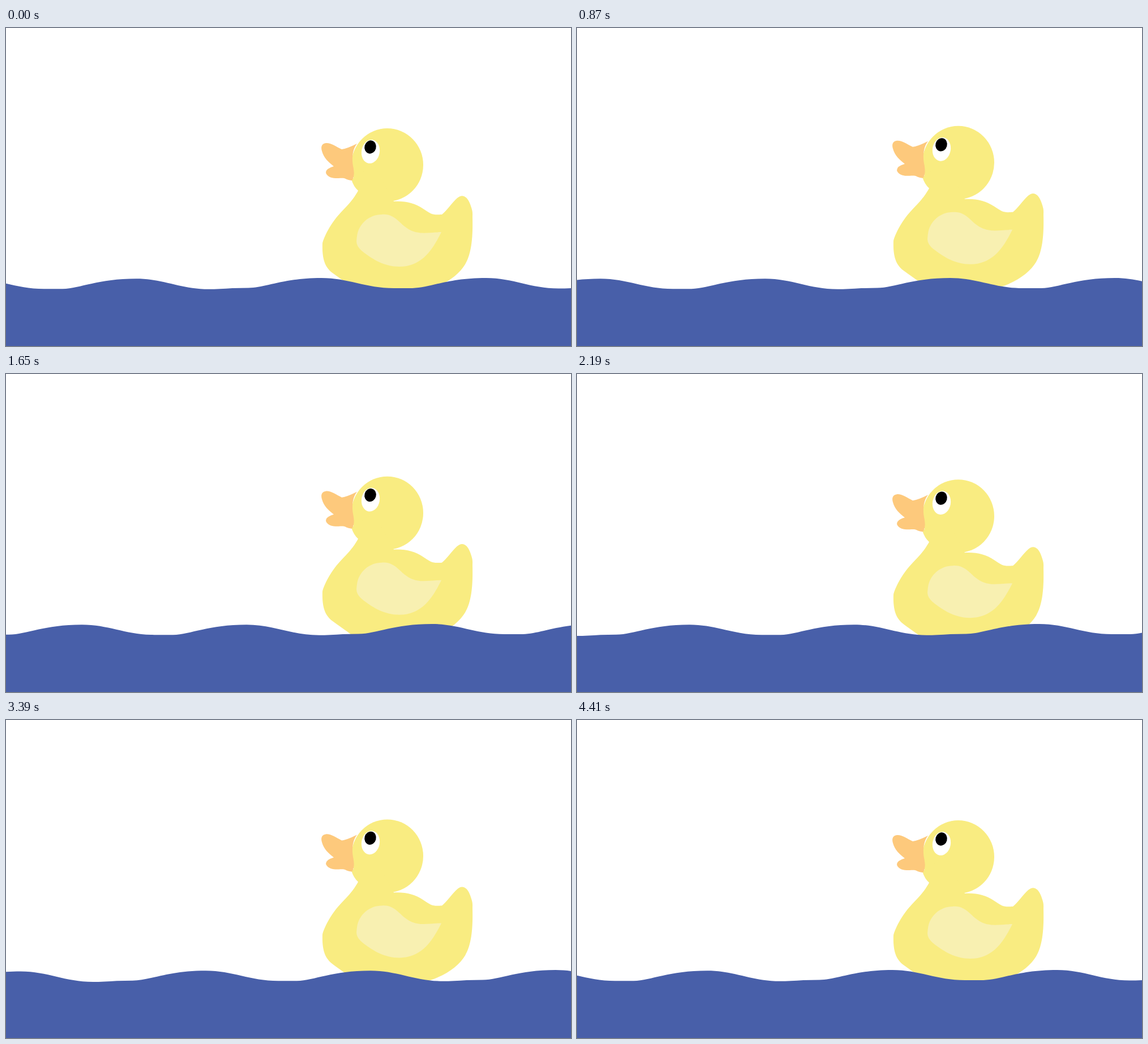
Write an HTML page that moves like this. It is 998 by 561 pixels and loops after 4440 ms.

```html
<!DOCTYPE html>
<html lang="en">
<head>
<meta charset="utf-8">
<title>Bobbing duck</title>
<style>
  html, body { margin: 0; height: 100%; overflow: hidden; background: #fff; }
  svg { display: block; width: 100vw; height: 100vh; }
</style>
</head>
<body>
<svg viewBox="0 0 998 561" preserveAspectRatio="none">
  <g id="duck">
    <g fill="#f9ec81">
      <ellipse cx="673.5" cy="241.5" rx="63.5" ry="64.5"/>
      <path d="M685 306C706 305 722 309 737 319S753 330 770 329C778 323 788 308 797 300S815 297 820 311
        S824 325 824 335C825 375 821 400 811 417S778 452 748 461S655 480 620 463C603 451 592 443 578 433
        S558 409 559 380C561 370 573 345 590 327S613 303 622 287Q614 280 610 267L650 241Z"/>
    </g>
    <path fill="#f8f0b1" d="M664 329C688 327 696 348 714 356.5S745 360.5 769 360C754 390 735 421 695 421
      C668 421 648 408 632 396S619 376 620 367C623 345 642 329 664 329Z"/>
    <path fill="#fdc97c" d="M620 204Q602 213 593 214C583 209 573 202 565 203S556 211 558 217
      C561 229 570 237 579 244Q565 248 565 255C566 261 574 265 582 265S597 264 600 266S609 269 611 269
      C616 262 615 253 613 243S611 215 620 204Z"/>
    <ellipse fill="#fff" rx="16" ry="21" transform="translate(644 218) rotate(10)"/>
    <ellipse rx="10.2" ry="11.7" transform="translate(643.5 210) rotate(15)"/>
  </g>
  <path id="water" fill="#485fa9"/>
</svg>
<script>
const LOOP = 4440, STEP = 30, SWELL = 618, RISE = 1.2;
const duck = document.getElementById('duck');
const water = document.getElementById('water');

// One swell holds two crests and ends RISE higher than it starts.
const crests = 'l28-.4c32-.6 62-17.6 129-17.6 48 0 78 18 128 18h33' +
               'c32-1 62-18 130-18 48 0 78 18.4 128 18.6';
const swell = `${crests}q19 0 42${-1.0 - RISE + .4}`;
water.setAttribute('d', `M${400 - 2 * SWELL} ${459 + 2 * RISE}${swell.repeat(3)}V600H${400 - 2 * SWELL}Z`);

// Key poses; the motion between them is linear.
const poses = [
  { t: 0, bob: 0, drift: 0 },
  { t: 600, bob: -6.9, drift: 70 },
  { t: 2363, bob: 10.9, drift: 280 },
  { t: 3190, bob: -6.3, drift: 377 },
  { t: 3685, bob: 5.3, drift: 468 },
  { t: 4410, bob: 0, drift: SWELL }
];

function draw() {
  const t = Math.floor(performance.now() % LOOP / STEP) * STEP;
  const i = Math.max(1, poses.findIndex(p => p.t >= t));
  const a = poses[i - 1], b = poses[i];
  const k = (t - a.t) / (b.t - a.t);
  const mix = key => a[key] + (b[key] - a[key]) * k;
  const lift = i === poses.length - 1 ? -RISE * k : 0;
  duck.setAttribute('transform', `translate(0 ${mix('bob')})`);
  water.setAttribute('transform', `translate(${mix('drift')} ${lift})`);
  requestAnimationFrame(draw);
}
draw();
</script>
</body>
</html>
```
